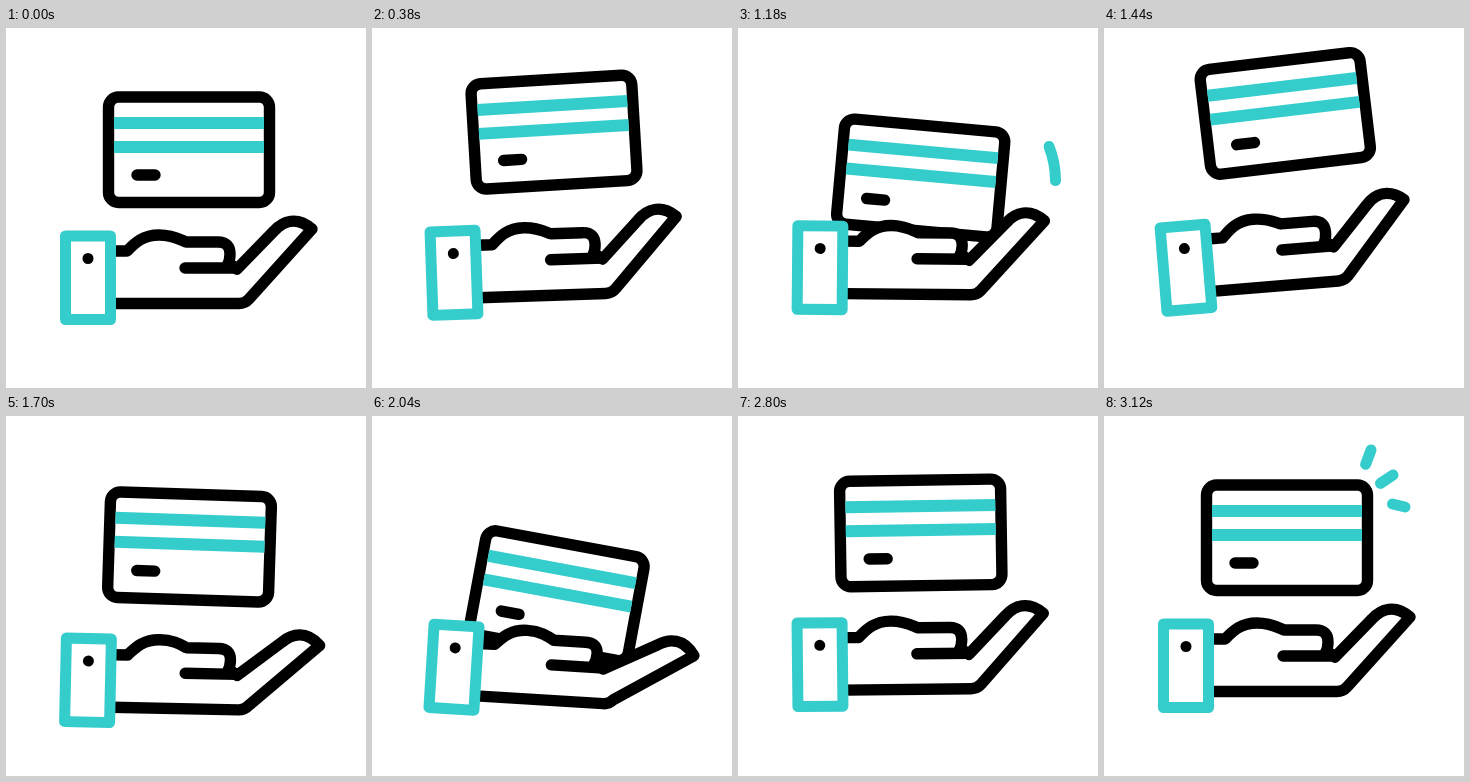
Recreate the animation shown at these times as an HTML page. Size 360x360 px, loop 3.14 s.

```html
<!DOCTYPE html>
<html lang="en">
<head>
<meta charset="utf-8">
<title>Card toss</title>
<style>
  html, body { margin: 0; height: 100%; overflow: hidden; background: #fff; }
  svg { display: block; width: 100vw; height: 100vh; }
  .ink, .teal { fill: none; stroke: #000; stroke-width: 11.4; stroke-linecap: round; stroke-linejoin: round; }
  .teal { stroke: #35cccc; stroke-width: 11; }
  .solid { fill: #fff; }
  .flat { stroke-linecap: butt; stroke-width: 12; }
</style>
</head>
<body>
<svg viewBox="0 0 360 360">
  <g id="card">
    <rect class="ink solid" x="102.5" y="69" width="161" height="105.5" rx="10"/>
    <path class="teal flat" d="M108 95H258M108 119H258"/>
    <path class="ink" d="M131 147H149"/>
  </g>
  <g id="hand">
    <g id="arm">
      <path id="body" fill="#fff"/>
      <path id="palm" class="ink"/>
      <path class="ink" d="M179 240H231"/>
    </g>
    <rect class="teal solid" x="59.5" y="208" width="45" height="83.5"/>
    <circle cx="82" cy="230.5" r="5.5"/>
  </g>
  <path id="swoosh" class="teal"/>
  <path id="rays" class="teal"/>
</svg>
<script>
const LOOP = 3140;
const el = id => document.getElementById(id);
const [card, hand, arm, body, palm, swoosh, rays] =
  ['card', 'hand', 'arm', 'body', 'palm', 'swoosh', 'rays'].map(el);

// time, card x, card y, card angle, hand y, hand angle, finger bend
const toss = [
  [-20, .5, 9, 1.8, 14.5, 1.2, 6.5],
  [0, .5, 15, 3, 14.8, 1.8, 11.5],
  [160, 1.5, 62, 9, 18, 3.4, 18],
  [320, 2, 58, 10.5, 1.5, 3.5, 15.7],
  [520, -.3, 28.5, 5.2, -10, .5, 0],
  [600, -.8, -9, 2, -11.5, -2.2, 0],
  [780, -1.7, -36.3, -6.8, -10, -4.7, -1]
];
const rest = t => [t, 0, 0, 0, 0, 0, 0];
const tossAt = t => toss.map(([dt, ...pose]) => [t + dt, ...pose]);
const keys = [
  rest(0), rest(180), [400, -1, -18, -3.5, -5, -2, 0],
  ...tossAt(660), ...tossAt(1720), rest(2890), rest(LOOP)
];

// Monotone cubic: smooth through the keys, flat at turning points
const secant = (i, k) => (keys[i + 1][k] - keys[i][k]) / (keys[i + 1][0] - keys[i][0]);
function slope(i, k) {
  if (i === 0 || i === keys.length - 1) return 0;
  const a = secant(i - 1, k), b = secant(i, k);
  return a * b > 0 ? 2 * a * b / (a + b) : 0;
}
function valueAt(t, k) {
  let i = 0;
  while (i < keys.length - 2 && t >= keys[i + 1][0]) i++;
  const p = keys[i], q = keys[i + 1], h = q[0] - p[0], u = (t - p[0]) / h, v = 1 - u;
  return p[k] * (1 + 2 * u) * v * v + q[k] * u * u * (3 - 2 * u)
    + h * u * v * (slope(i, k) * v - slope(i + 1, k) * u);
}

const rad = deg => deg * Math.PI / 180;
const span = (t, from, to) => Math.min(1, Math.max(0, (t - from) / (to - from)));

// The fingers turn about the heel of the palm and the thumb sags with them
function drawArm(bend) {
  const c = Math.cos(rad(bend)), s = Math.sin(rad(bend));
  const at = (x, y) => {
    const dx = x - 237, dy = y - 265;
    return `${237 + dx * c - dy * s} ${265 + dx * s + dy * c}`;
  };
  const y = 214 + bend * .08;
  const thumb = `M106 223H121C128 216 136 207 153 207C166 207 173 211 180 ${y}H212Q224 ${y} 224 226`;
  const fingers = `L231 241L${at(268, 203)}C${at(277, 193)} ${at(291, 188)} ${at(306, 201)}`
    + 'L243 271Q239 275.5 233 275.5H106';
  palm.setAttribute('d', `${thumb}Q224 233 221 238M224 236${fingers}`);
  body.setAttribute('d', `${thumb}${fingers}Z`);
  arm.setAttribute('transform', `translate(0 ${bend * .1})`);
}

function arc(from, to) {
  const at = a => `${224.5 + 93 * Math.cos(rad(a))} ${152.5 + 93 * Math.sin(rad(a))}`;
  return `M${at(from)}A93 93 0 0 1 ${at(to)}`;
}
function ray([x1, y1, x2, y2], a, b) {
  const at = u => `${x1 + (x2 - x1) * u} ${y1 + (y2 - y1) * u}`;
  return `M${at(a)}L${at(b)}`;
}
const rayLines = [[258, 58, 267, 34], [268, 73, 289, 59], [280, 86, 301, 91]];

function draw(t) {
  const [x, y, turn, lift, tilt, bend] = [1, 2, 3, 4, 5, 6].map(k => valueAt(t, k));
  card.setAttribute('transform', `translate(${x} ${y}) rotate(${turn} 183 122)`);
  hand.setAttribute('transform', `translate(0 ${lift}) rotate(${tilt} 82 250)`);
  drawArm(bend);

  const tail = span(t, 680, 1320), head = span(t, 540, 870);
  swoosh.setAttribute('d', head > tail ? arc(-99 + 99 * tail, -99 + 99 * head) : '');

  const inner = span(t, 3010, 3285), outer = span(t, 2900, 3040);
  rays.setAttribute('d', outer > inner ? rayLines.map(r => ray(r, inner, outer)).join('') : '');
}

const start = performance.now();
function tick() {
  draw((performance.now() - start) % LOOP);
  requestAnimationFrame(tick);
}
tick();
</script>
</body>
</html>
```
